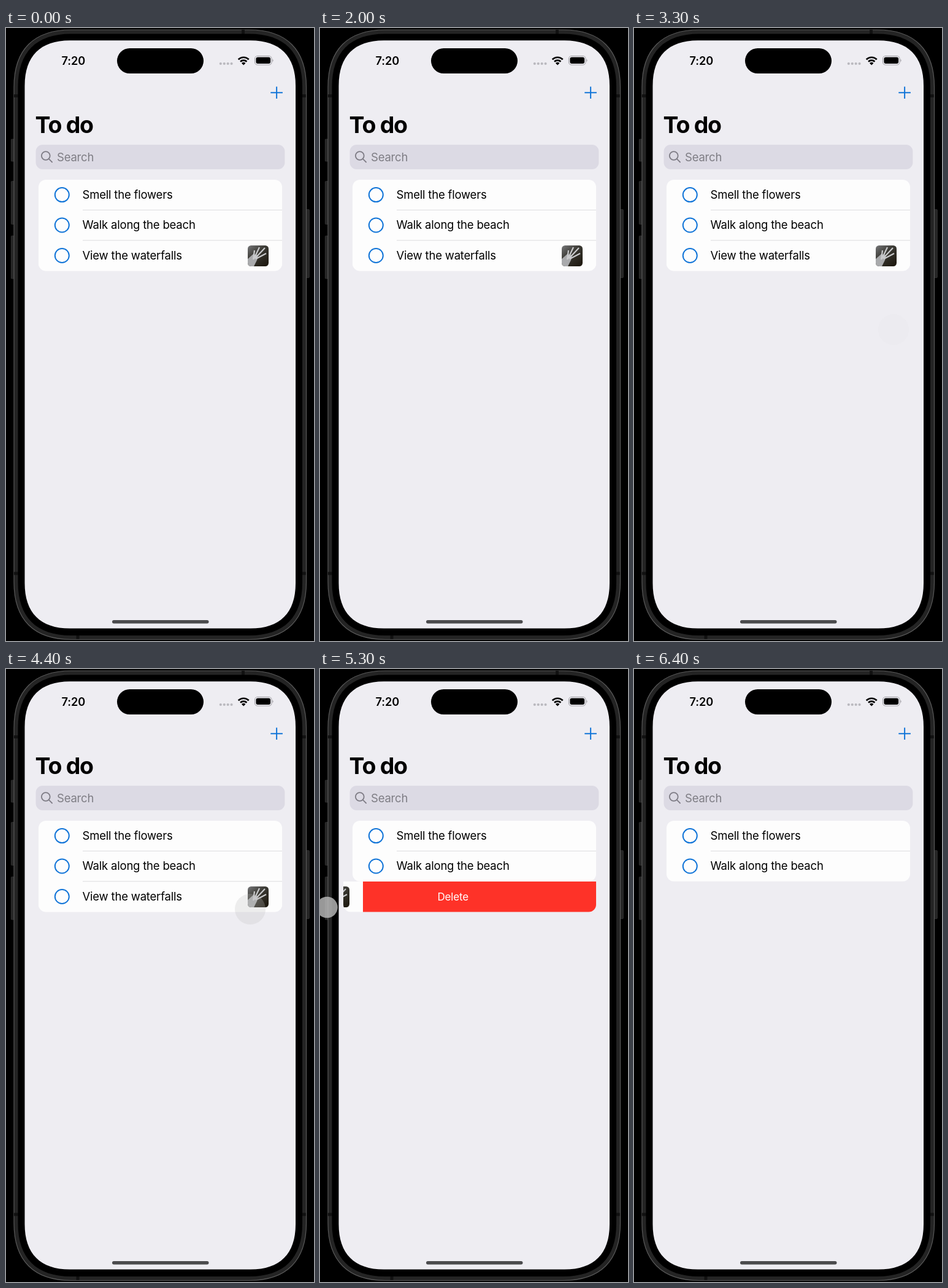
Write an HTML page that moves like this. It is 502 px wide and 998 px high and loops after 9800 ms.

```html
<!DOCTYPE html>
<html lang="en">
<head>
<meta charset="utf-8">
<title>To do</title>
<style>
  html, body { margin: 0; width: 100%; height: 100%; overflow: hidden; background: #000; }
  svg { display: block; width: 502px; height: 998px; }
  text { font-family: Inter, "Noto Sans", sans-serif; font-optical-sizing: none; }
  .title { font-size: 37.5px; font-weight: 700; letter-spacing: -1.3px; }
  .clock { font-size: 18.2px; font-weight: 600; letter-spacing: -.1px; }
  .item, .hint { font-size: 18.5px; letter-spacing: -.2px; }
  .hint { fill: #7e7d84; }
  .delete { font-size: 17px; letter-spacing: -.15px; fill: #fff; }
  .ring { fill: none; stroke: #1275d8; stroke-width: 2; }
  .line { stroke: #dcdcdf; }
  .button { fill: #262626; stroke: #333; stroke-width: .8; }
</style>
</head>
<body>
<svg viewBox="0 0 502 998">
  <defs>
    <clipPath id="rowClip"><rect id="rowArea" y="300" rx="12"/></clipPath>
    <clipPath id="thumbClip"><rect x="394" y="354" width="34" height="34" rx="5.5"/></clipPath>
    <linearGradient id="rock" x2=".8" y2="1">
      <stop offset="0" stop-color="#77787a"/>
      <stop offset=".45" stop-color="#3a3933"/>
      <stop offset="1" stop-color="#1f1a11"/>
    </linearGradient>
  </defs>

  <!-- phone -->
  <g class="button">
    <rect x="8.4" y="181" width="6" height="36" rx="1"/>
    <rect x="8.4" y="249.5" width="6" height="70" rx="1"/>
    <rect x="8.4" y="338.5" width="6" height="69.5" rx="1"/>
    <rect x="488" y="295.5" width="6.4" height="111" rx="1"/>
  </g>
  <path id="body" fill="#242424" stroke="#585858" stroke-width="1.2"/>
  <path d="M386.5 3v7M117 988v7M13 110.5h7M482 110.5h7M13 888h7M482 888h7" stroke="#111" stroke-width="5"/>
  <path id="bezel"/>
  <path id="screen" fill="#eeedf2"/>

  <!-- status bar -->
  <text class="clock" x="90.6" y="60">7:20</text>
  <rect x="181" y="33" width="141" height="41" rx="20.5"/>
  <path d="M349.8 58h18" stroke="#b9b8be" stroke-width="4.2" stroke-linecap="round" stroke-dasharray="0 5.93"/>
  <g fill="none" stroke="#000" stroke-width="2.7">
    <path d="M378.7 51.2a12.200 12.200 0 0 1 17 0"/>
    <path d="M382 54.700a7.500 7.500 0 0 1 10.400 0"/>
  </g>
  <path d="M387.200 60.500l-3.200-3.300a4.700 4.700 0 0 1 6.400 0z"/>
  <rect x="405.500" y="45.500" width="27.500" height="14.500" rx="4.600" fill="none" stroke="#a3a2a7" stroke-width="1.100"/>
  <rect x="407.400" y="47.600" width="23.700" height="10.500" rx="3"/>
  <path d="M434.400 50.400q2.600 2.300 0 4.800z" fill="#a3a2a7"/>

  <!-- header -->
  <path d="M431.300 105.300h19.600M441.100 95.500v19.600" stroke="#1275d8" stroke-width="2"/>
  <text class="title" x="47.600" y="171">To do</text>
  <rect x="48.600" y="190" width="405.800" height="40" rx="11" fill="#dcdae4"/>
  <g fill="none" stroke="#7d7b84" stroke-width="1.800" stroke-linecap="round">
    <circle cx="64.800" cy="208" r="6.900"/><path d="M69.900 213.100l5.200 5.200"/>
  </g>
  <text class="hint" x="83" y="217">Search</text>

  <!-- list -->
  <rect id="card" x="53" y="247" width="397" rx="12" fill="#fdfdfd"/>
  <circle class="ring" cx="91.300" cy="271.600" r="11.500"/>
  <text class="item" x="124.500" y="278">Smell the flowers</text>
  <path class="line" d="M125 296.300H450"/>
  <circle class="ring" cx="91.300" cy="321" r="11.500"/>
  <text class="item" x="124.500" y="327.400">Walk along the beach</text>
  <g id="row" clip-path="url(#rowClip)">
    <g id="cell">
      <rect x="53" y="346" width="397" height="50" fill="#fdfdfd"/>
      <circle class="ring" cx="91.300" cy="370.500" r="11.500"/>
      <text class="item" x="124.500" y="377">View the waterfalls</text>
      <g clip-path="url(#thumbClip)">
        <path d="M394 354h34v34h-34z" fill="url(#rock)"/>
        <path d="M394 388v-12l9-8 8 2-2 8-5 10z" fill="#a9aaac"/>
        <path d="M403 377l2-15M404 376l9-19M406 375l16-17M407 376l17-9" fill="none" stroke="#c9cacc" stroke-width="2.200"/>
      </g>
    </g>
    <rect id="red" y="346" height="50" fill="#fe3228"/>
    <text id="label" class="delete" y="377">Delete</text>
  </g>
  <path id="divider" class="line" d="M125 345.800H450"/>

  <rect x="173" y="964" width="157.500" height="5.500" rx="2.750" fill="#4b4b4d"/>
  <circle id="touch" fill="#bfbfbf"/>
</svg>
<script>
  const LOOP = 9800, STEP = 100;
  const LEFT = 53, RIGHT = 450, ROW = 49.4;
  const $ = id => document.getElementById(id);
  const set = (id, attrs) => {
    for (const key in attrs) $(id).setAttribute(key, attrs[key]);
  };
  const ramp = (t, from, to) => Math.min(1, Math.max(0, (t - from) / (to - from)));
  const mix = (a, b, f) => a + (b - a) * f;
  const smooth = f => f * f * (3 - 2 * f);

  // Rounded box with slightly softened corners of nominal radius r.
  function softBox(x, y, x2, y2, r) {
    const e = 1.15 * r, c = .398 * r;
    return `M${x + e} ${y}H${x2 - e}C${x2 - c} ${y} ${x2} ${y + c} ${x2} ${y + e}` +
      `V${y2 - e}C${x2} ${y2 - c} ${x2 - c} ${y2} ${x2 - e} ${y2}` +
      `H${x + e}C${x + c} ${y2} ${x} ${y2 - c} ${x} ${y2 - e}` +
      `V${y + e}C${x} ${y + c} ${x + c} ${y} ${x + e} ${y}Z`;
  }
  set('body', { d: softBox(13, 3, 489.5, 995.5, 81) });
  set('bezel', { d: softBox(19.5, 9.5, 483, 989, 75) });
  set('screen', { d: softBox(30.5, 20.3, 472, 977.5, 64) });

  // A short tap on the empty area that drifts away.
  function tap(t) {
    const drift = ramp(t, 3000, 3300);
    return {
      cx: mix(385, 423, drift),
      cy: mix(513, 491, drift),
      r: 25,
      opacity: .8 * ramp(t, 2300, 2500) * mix(1, .06, drift)
    };
  }

  // Press, accelerate to the left, let go.
  function swipe(t, drag) {
    const press = ramp(t, 4600, 4900);
    return {
      cx: mix(398, 385, press) - 373.5 * drag,
      cy: mix(391, 381, press) + 7 * drag,
      r: 25 - 7.7 * (press - ramp(t, 5300, 5400)),
      opacity: .8 * (ramp(t, 4300, 4600) - ramp(t, 5300, 5600))
    };
  }

  function draw(t) {
    const drag = ramp(t, 4900, 5300) ** 2.2;
    const settle = ramp(t, 5300, 5400);
    set('touch', t < 4300 ? tap(t) : swipe(t, drag));

    const offset = mix(380, RIGHT - LEFT, settle) * drag;
    const left = LEFT - 15 * (ramp(t, 5200, 5300) - settle);
    const height = ROW * (1 - smooth(ramp(t, 5400, 5900)));
    set('card', { height: offset ? 2 * ROW : 3 * ROW });
    set('divider', { opacity: offset ? 0 : 1 });
    set('row', { opacity: height ? 1 : 0 });
    set('rowArea', { x: left, width: RIGHT - left, height: 46 + height });
    set('cell', { transform: `translate(${-offset} 0)` });
    set('red', { x: RIGHT - offset, width: offset });
    set('label', { x: mix(378, 75, ramp(t, 5200, 5400) ** .7), opacity: offset > 60 ? 1 : 0 });
  }

  const start = performance.now();
  function tick() {
    const t = (performance.now() - start) % LOOP;
    draw(Math.floor(t / STEP) * STEP);
    requestAnimationFrame(tick);
  }
  tick();
</script>
</body>
</html>
```
